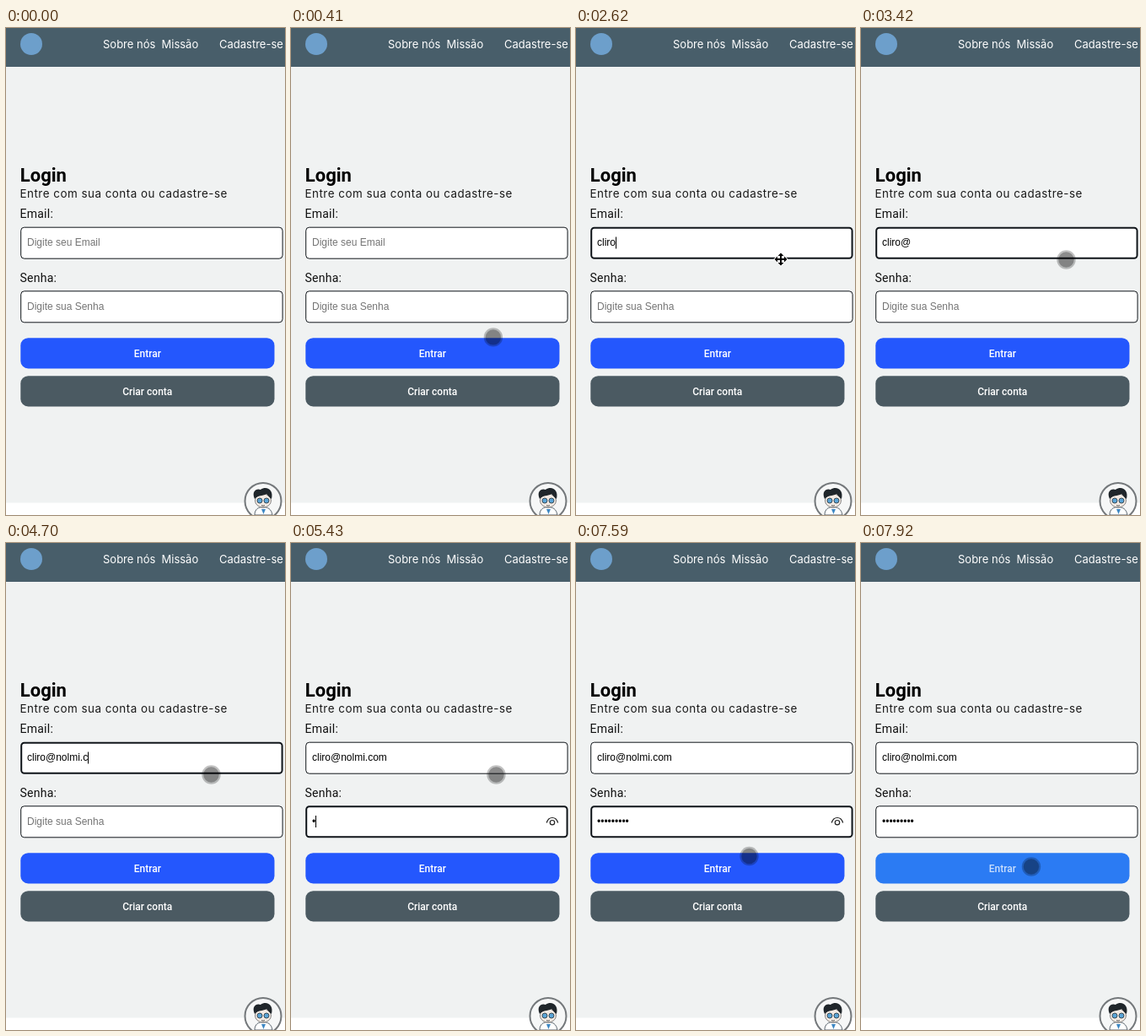
Write an HTML page that moves like this. It is 331x577 px and loops after 7.99 s.

```html
<!DOCTYPE html>
<html lang="pt-BR">
<head>
<meta charset="utf-8">
<title>Login</title>
<style>
html, body { margin: 0; width: 100%; height: 100%; overflow: hidden; background: #fff; }
svg { display: block; width: 331px; height: 577px; }
text { white-space: pre; }
.nav { font: 400 13px Inter, sans-serif; fill: #fff; }
.title { font: 700 22px Roboto, sans-serif; }
.sub { font: 13.4px Inter, sans-serif; letter-spacing: .5px; fill: #1a1a1a; }
.label { font: 14px Roboto, sans-serif; letter-spacing: .25px; fill: #111; }
.field { font: 12px "Liberation Sans", Arial, sans-serif; }
.btn { font: 500 12px Roboto, sans-serif; fill: #fff; text-anchor: middle; }
.box { fill: #fff; stroke: #10151a; }
</style>
</head>
<body>
<svg viewBox="0 0 331 577">
  <rect width="331" height="562.5" fill="#f0f2f2"/>
  <rect width="331" height="46" fill="#485e6a"/>
  <circle cx="30" cy="19" r="13" fill="#6d9fcb"/>
  <g class="nav">
    <text x="115" y="24">Sobre nós</text>
    <text x="184.5" y="24">Missão</text>
    <text x="253" y="24">Cadastre-se</text>
  </g>
  <text class="title" x="16.8" y="181.5">Login</text>
  <text class="sub" x="16.5" y="201">Entre com sua conta ou cadastre-se</text>
  <text class="label" x="16.5" y="225">Email:</text>
  <text class="label" x="16.5" y="301">Senha:</text>

  <rect id="mailBox" class="box"/>
  <rect id="passBox" class="box"/>
  <text id="mail" class="field" x="25" y="258"></text>
  <text id="pass" class="field" x="25" y="334"></text>
  <rect id="caret" width="1" height="14"/>
  <g id="eye" fill="none" stroke="#222" stroke-width="1.2">
    <path d="M303.3 331.5C305.5 323.5 314.5 323.5 316.7 331.5"/>
    <circle cx="310" cy="331.2" r="2.7"/>
  </g>

  <rect id="enter" x="17.3" y="367.2" width="301.2" height="36.2" rx="9"/>
  <text id="enterText" class="btn" x="167.8" y="390">Entrar</text>
  <rect x="17.3" y="412.2" width="301.2" height="36.2" rx="9" fill="#4b5a62"/>
  <text class="btn" x="167.8" y="435">Criar conta</text>

  <g>
    <circle cx="305" cy="560.5" r="21.5" fill="#f6f7f7" stroke="#74787b" stroke-width="2"/>
    <path d="M295 577C295 570 300 567 305 568C310 567 315 570 316 577Z" fill="#fff" stroke="#56616a"/>
    <path d="M303 570h5l-2.500 6z" fill="#3c87c4"/>
    <ellipse cx="305" cy="560" rx="9.500" ry="8" fill="#f4ebe4" stroke="#555" stroke-width=".7"/>
    <path d="M295 558C291 549 297 545 302 547C309 542 318 547 315 558C312 556 311 554 309 552C304 555 299 553 295 558Z" fill="#20262b"/>
    <g fill="#5aa5d8" stroke="#3a4a54">
      <circle cx="301" cy="560" r="3"/>
      <circle cx="309" cy="560" r="3"/>
    </g>
    <path d="M303 565.500q2 1.500 4 0" fill="none" stroke="#555"/>
  </g>

  <g id="pointer">
    <g id="touch">
      <circle r="11.2" fill="#000" fill-opacity=".24"/>
      <circle r="9.2" fill="#000" fill-opacity=".28"/>
    </g>
    <path id="move" transform="translate(-.5 -.5)" d="M0-7.5L3.5-4H1V-1H4V-3.5L7.5 0L4 3.5V1H1V4H3.5L0 7.5L-3.5 4H-1V1H-4V3.5L-7.5 0L-4-3.5V-1H-1V-4H-3.5Z" stroke="#fff" stroke-width="1.6" paint-order="stroke"/>
  </g>
</svg>
<script>
const LOOP = 7990, BLINK = 530;
const FOCUS = 820, TAB = 5030, PRESS = 7850;
const address = "cliro@nolmi.com";
const mailKeys = [1610, 1810, 1880, 2010, 2210, 2890, 3770, 3880, 3970, 4100, 4300, 4500, 4700, 4830, 4900];
const passKeys = [5430, 5760, 5840, 5960, 6090, 6560, 6830, 6900, 6970];
// time, x, y
const path = [
  [70, 298, 550], [210, 276, 480], [340, 255, 418], [410, 240, 367],
  [480, 235.5, 325], [620, 243.5, 274.5], [7110, 243.5, 274.5],
  [7310, 231, 315], [7590, 205.5, 371], [7790, 202, 383.5]
];
const $ = id => document.getElementById(id);
const show = (el, on) => el.setAttribute("visibility", on ? "visible" : "hidden");
const set = (el, attrs) => { for (const k in attrs) el.setAttribute(k, attrs[k]); };
const within = (t, a, b) => t >= a && t < b;
const pressedBy = (keys, t) => keys.filter(k => k <= t).length;

function drawBox(el, y, focused) {
  const w = focused ? 2 : 1;
  set(el, {
    x: 17.2 + w / 2, y: y + w / 2, width: 311.4 - w, height: 38 - w,
    rx: 4.5 - w / 2, "stroke-width": w
  });
}

function drawText(el, typed, hint) {
  el.textContent = typed || hint;
  el.setAttribute("fill", typed ? "#000" : "#757575");
}

function pointerAt(t) {
  const i = path.findIndex(p => p[0] > t);
  if (i < 0) return path[path.length - 1].slice(1);
  if (i === 0) return path[0].slice(1);
  const [a, ax, ay] = path[i - 1], [b, bx, by] = path[i];
  const k = (t - a) / (b - a);
  return [ax + (bx - ax) * k, ay + (by - ay) * k];
}

function draw(t) {
  const onMail = within(t, FOCUS, TAB), onPass = within(t, TAB, PRESS);
  const mail = address.slice(0, pressedBy(mailKeys, t));
  const pass = "•".repeat(pressedBy(passKeys, t));

  drawBox($("mailBox"), 235.7, onMail);
  drawBox($("passBox"), 311.3, onPass);
  drawText($("mail"), mail, "Digite seu Email");
  drawText($("pass"), pass, "Digite sua Senha");
  show($("eye"), onPass && pass);

  const last = Math.max(...[FOCUS, TAB, ...mailKeys, ...passKeys].filter(k => k <= t));
  show($("caret"), (onMail || onPass) && Math.floor((t - last) / BLINK) % 2 === 0);
  const typed = onMail ? mail : pass;
  const end = typed ? $(onMail ? "mail" : "pass").getComputedTextLength() : 0;
  set($("caret"), { x: Math.floor(25 + end), y: onMail ? 247.5 : 323 });

  const pressed = t >= PRESS;
  $("enter").setAttribute("fill", pressed ? "#2b7bf3" : "#2457fd");
  $("enterText").setAttribute("fill-opacity", pressed ? 0.75 : 1);

  const moving = within(t, 2620, 3080) || within(t, 6290, 6630);
  $("pointer").setAttribute("transform", `translate(${pointerAt(t)})`);
  show($("touch"), t >= 70 && !moving);
  show($("move"), moving);
}

function tick() {
  draw(performance.now() % LOOP);
  requestAnimationFrame(tick);
}
tick();
</script>
</body>
</html>
```
